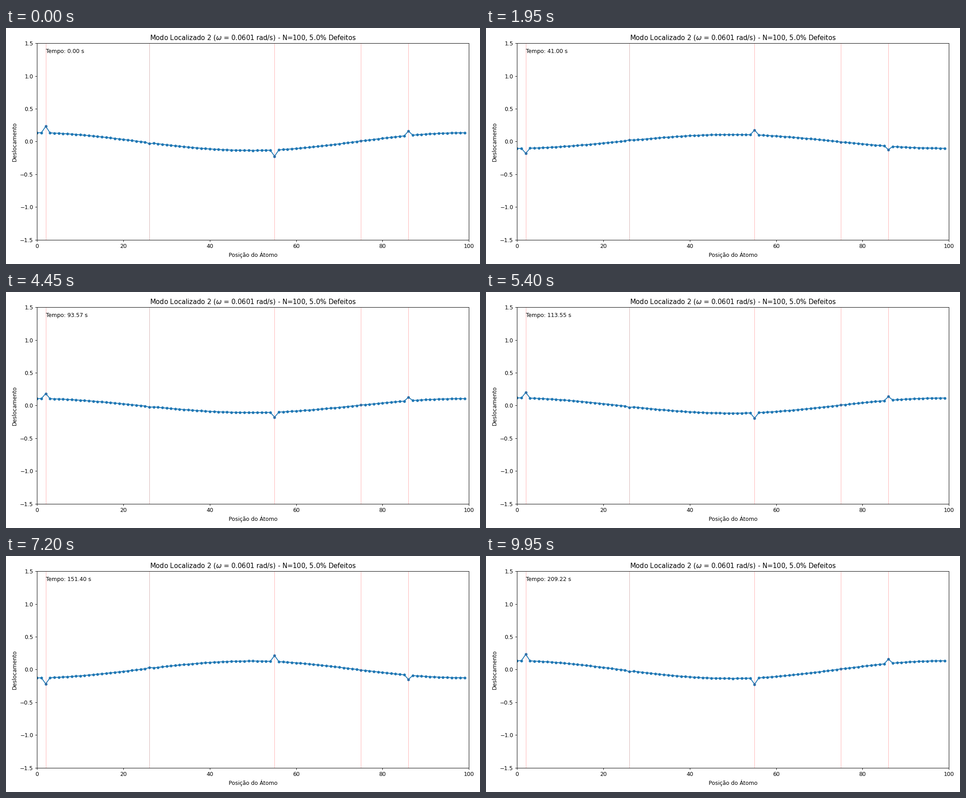
Recreate the animation shown at these times as a matplotlib script. Size 1058 by 529 pixels, loop 10000 ms.

```python
import numpy as np
import matplotlib.pyplot as plt
from matplotlib.animation import FuncAnimation

plt.rcParams["font.family"] = "DejaVu Sans"

N = 100
FRAMES = 200
TOTAL = 209.2245          # two periods of the mode, in seconds
HEAVY = 3.0               # mass of a defect atom
DEFECTS = {2: "red", 26: "#780000", 55: "red", 75: "red", 86: "red"}


def mode_shape(index):
    """Mass-weighted normal mode of a free chain with unit springs."""
    mass = np.ones(N)
    mass[list(DEFECTS)] = HEAVY
    k = 2 * np.eye(N) - np.eye(N, k=1) - np.eye(N, k=-1)
    k[0, 0] = k[-1, -1] = 1
    root = np.sqrt(mass)
    _, vectors = np.linalg.eigh(k / np.outer(root, root))
    v = vectors[:, index]
    return v * np.sign(v[0])


shape = mode_shape(2)
times = np.linspace(0, TOTAL, FRAMES)
omega = 4 * np.pi / TOTAL

fig, ax = plt.subplots(figsize=(12, 6), dpi=88.1667)
chain, = ax.plot(np.arange(N), shape, "o-", color="#1f77b4",
                 markersize=4, linewidth=1.5)
for pos, color in DEFECTS.items():
    ax.axvline(pos, color=color, alpha=0.3, linewidth=0.8)

ax.set_xlim(0, N)
ax.set_ylim(-1.5, 1.5)
ax.set_xlabel("Posição do Átomo")
ax.set_ylabel("Deslocamento")
ax.set_title(r"Modo Localizado 2 ($\omega$ = 0.0601 rad/s)"
             " - N=100, 5.0% Defeitos")
clock = ax.text(0.02, 0.95, "Tempo: 0.00 s", transform=ax.transAxes)
fig.tight_layout()


def update(i):
    t = times[i]
    chain.set_ydata(shape * np.cos(omega * t))
    clock.set_text(f"Tempo: {t:.2f} s")
    return chain, clock


anim = FuncAnimation(fig, update, frames=FRAMES, interval=50,
                     repeat=True, repeat_delay=0, blit=False)
plt.show()
```
